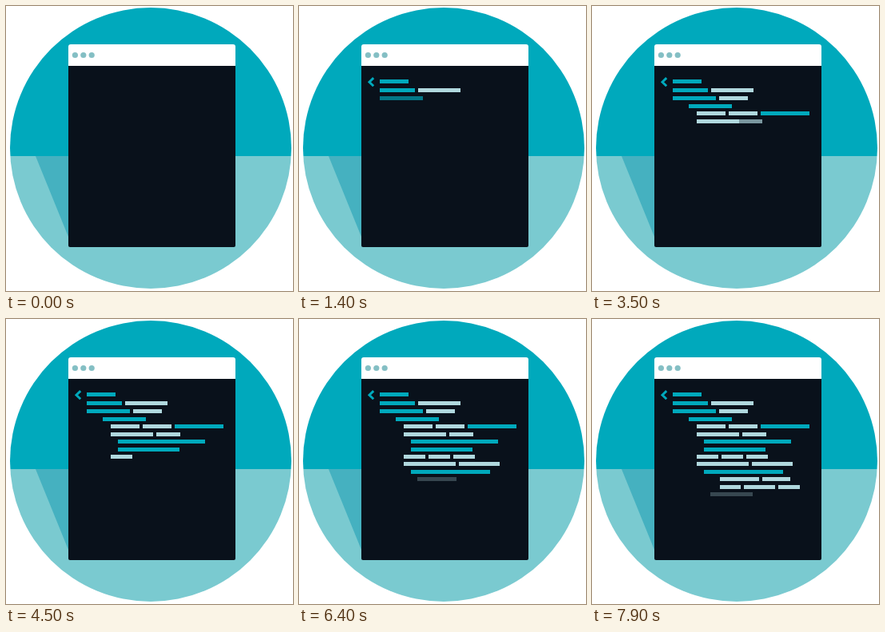
These frames come from a looping animation (359x357 px, 8 s). An HTML page with a canvas:

```html
<!DOCTYPE html>
<html lang="en">
<head>
<meta charset="utf-8">
<title>Code window</title>
<style>
html, body { margin: 0; width: 100%; height: 100%; overflow: hidden; background: #fff; }
canvas { display: block; width: 359px; height: 357px; }
</style>
</head>
<body>
<canvas id="stage" width="359" height="357"></canvas>
<script>
const ctx = document.getElementById('stage').getContext('2d');
const LOOP = 8000, FADE = 200, SLIDE = 17, GAP = 4;
const TEAL = '#00a9bc', LIGHT = '#b0d8de', DARK = '#09111b';

const clamp = (v, lo, hi) => Math.max(lo, Math.min(hi, v));
const key = w => ({ w, teal: true });
const word = w => ({ w, teal: false });

// Each line of code: indent level, then its words by width
const code = [
  [0, key(36)],
  [0, key(44), word(53)],
  [0, key(54), word(36)],
  [2, key(54)],
  [3, word(36), word(36), key(61)],
  [3, word(53), word(30)],
  [4, key(109)],
  [4, key(77)],
  [3, word(27), word(27), word(27)],
  [3, word(65), word(51)],
  [4, key(99)],
  [6, word(49), word(35)],
  [6, word(26), word(39), word(27)],
  [6, word(53)]
];

// The opening lines are spaced a little wider than the rest
const lineY = n => Math.round(92.36 + 9.45 * n + Math.min(n, 2));
const indentX = level => Math.round(101.2 + 9.8 * level);

const bars = code.flatMap(([level, ...words], n) => {
  let x = indentX(level);
  return words.map(({ w, teal }) => {
    const bar = { x, y: lineY(n), w, teal };
    x += w + GAP;
    return bar;
  });
});

// Steady typing with a slower stretch in the middle
const startOf = i => 65 + 300 * i + 47 * clamp(i - 14, 0, 6);
const progress = (i, t) => clamp((t - startOf(i)) / FADE, 0, 1);

function rect(x, y, w, h, color) {
  ctx.fillStyle = color;
  ctx.fillRect(x, y, w, h);
}

function disc(x, y, r, color) {
  ctx.fillStyle = color;
  ctx.beginPath();
  ctx.arc(x, y, r, 0, Math.PI * 2);
  ctx.fill();
}

function drawScene() {
  rect(0, 0, 359, 357, '#fff');
  ctx.save();
  ctx.beginPath();
  ctx.arc(181, 178, 176, 0, Math.PI * 2);
  ctx.clip();
  rect(0, 0, 359, 188, TEAL);
  rect(0, 188, 359, 169, '#7acad0');
  ctx.restore();

  ctx.fillStyle = '#45b1c0';
  ctx.beginPath();
  ctx.moveTo(37, 188);
  ctx.lineTo(80, 188);
  ctx.lineTo(80, 294);
  ctx.fill();

  ctx.save();
  ctx.beginPath();
  ctx.roundRect(78, 48, 209, 254, [3, 3, 2, 2]);
  ctx.clip();
  rect(78, 48, 209, 27, '#fff');
  rect(78, 75, 209, 227, DARK);
  ctx.restore();
  for (let i = 0; i < 3; i++) disc(86.4 + 10.4 * i, 61.5, 3.6, '#84bfc4');
}

function drawChevron(alpha) {
  ctx.globalAlpha = alpha;
  ctx.strokeStyle = TEAL;
  ctx.lineWidth = 3;
  ctx.beginPath();
  ctx.moveTo(93.2, 90.1);
  ctx.lineTo(88, 95.2);
  ctx.lineTo(93.2, 100.3);
  ctx.stroke();
}

function draw(t) {
  ctx.globalAlpha = 1;
  drawScene();
  drawChevron(progress(0, t));
  bars.forEach(({ x, y, w, teal }, i) => {
    const p = progress(i + 1, t);
    const shift = teal ? 0 : Math.round(SLIDE * (1 - p));
    ctx.globalAlpha = p;
    rect(x - shift, y, w, 5, teal ? TEAL : LIGHT);
  });
}

const began = performance.now();
function tick() {
  draw((performance.now() - began) % LOOP);
  requestAnimationFrame(tick);
}
tick();
</script>
</body>
</html>
```
